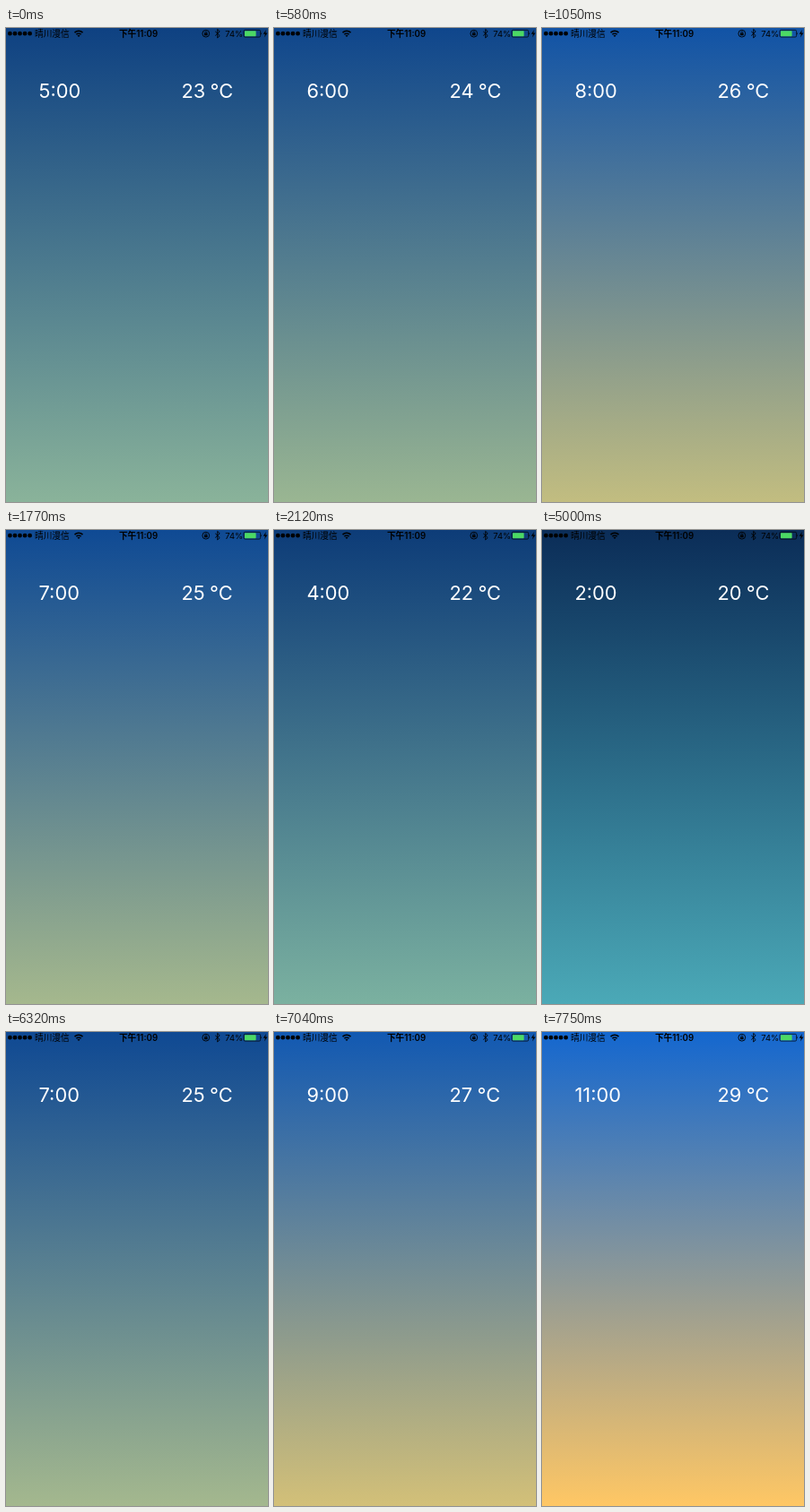
Animation of 292x529 px, one loop 8 s. Source, as an HTML page:

```html
<!DOCTYPE html>
<html lang="zh">
<head>
<meta charset="utf-8">
<style>
  html, body { margin: 0; width: 100%; height: 100%; overflow: hidden; }
  svg { display: block; width: 100vw; height: 100vh; }
  .reading { font: 400 21.8px Inter, Roboto, sans-serif; word-spacing: -.8px; fill: #fff; }
  .status { font: 400 9.7px Inter, "Noto Sans CJK SC", "Noto Sans CJK", sans-serif; }
  .clock { font-weight: 600; }
  .line { fill: none; stroke: #000; }
</style>
</head>
<body>
<svg viewBox="0 0 292 529" preserveAspectRatio="none">
  <defs>
    <linearGradient id="sky" x1="0" y1="0" x2="0" y2="1">
      <stop id="top" offset="0"/>
      <stop id="bottom" offset="1"/>
    </linearGradient>
  </defs>
  <rect width="292" height="529" fill="url(#sky)"/>

  <g class="status">
    <path d="M4.4 6.2h22.3" class="line" stroke-width="4.8" stroke-linecap="round" stroke-dasharray="0 5.55"/>
    <text x="32" y="9.7">晴川漫信</text>
    <path class="line" d="M76.5 5.1a6.4 6.4 0 0 1 9 0M78.4 7.2a3.7 3.7 0 0 1 5.2 0" stroke-width="1.5"/>
    <path d="M79.5 8.5a2.1 2.1 0 0 1 3 0l-1.5 1.6z"/>
    <text class="clock" x="147.5" y="9.7" text-anchor="middle">下午11:09</text>
    <circle class="line" cx="222.8" cy="6.2" r="3.9" stroke-width=".9"/>
    <path d="M221 5.7h3.6v2.6H221z"/>
    <path class="line" d="M221.8 6V4.9a1 1 0 0 1 2 0V6" stroke-width=".7"/>
    <path class="line" d="M233.2 3.8l5 4.8-2.5 2.4V1.4l2.5 2.4-5 4.8" stroke-width=".9"/>
    <text x="244.3" y="9.7" font-size="9.3">74%</text>
    <rect class="line" x="265" y="2.3" width="18.6" height="7.8" rx="1.4" stroke-width=".7"/>
    <rect x="266" y="3.2" width="12.6" height="6" rx=".6" fill="#4cd964"/>
    <path d="M284.4 4.8q1.5 1.4 0 2.8z"/>
    <path d="M289.9 2l-3.2 4.8h2.2l-1 3.8 3.5-5.2h-2.3z"/>
  </g>

  <text id="hour" class="reading" x="36.5" y="78"></text>
  <text id="degrees" class="reading" x="195.5" y="78"></text>
</svg>
<script>
  const LOOP = 8000;
  const FRAME = 120;
  const FIRST = .39;
  // Each drag moves the day (0 = night, 1 = noon) to a new place, in even jumps.
  const DRAGS = [
    { start: 350, end: 1050, to: .68 },
    { start: 1640, end: 2600, to: .02 },
    { start: 5000, end: 5240, to: .14 },
    { start: 5960, end: 6440, to: .62 },
    { start: 6680, end: 7750, to: 1 }
  ];
  const TOP = [[10, 41, 80], [20, 103, 207]];
  const BOTTOM = [[63, 167, 188], [255, 199, 100]];

  const byId = id => document.getElementById(id);
  const lerp = (a, b, p) => a + (b - a) * p;
  const mix = ([from, to], p) =>
    `rgb(${from.map((c, i) => Math.round(lerp(c, to[i], p)))})`;

  function dayAt(time) {
    let day = FIRST;
    for (const { start, end, to } of DRAGS) {
      if (time < start) break;
      const jumps = Math.round((end - start) / FRAME);
      const done = Math.floor((Math.min(time, end) - start) * jumps / (end - start));
      day = lerp(day, to, (done + 1) / (jumps + 1));
    }
    return day;
  }

  function show(day) {
    const hour = Math.round(1.3 + 10 * day);
    byId('top').setAttribute('stop-color', mix(TOP, day));
    byId('bottom').setAttribute('stop-color', mix(BOTTOM, day));
    byId('hour').textContent = `${hour}:00`;
    byId('degrees').textContent = `${hour + 18} °C`;
  }

  const origin = performance.now();
  function tick() {
    show(dayAt((performance.now() - origin) % LOOP));
    requestAnimationFrame(tick);
  }
  tick();
</script>
</body>
</html>
```
